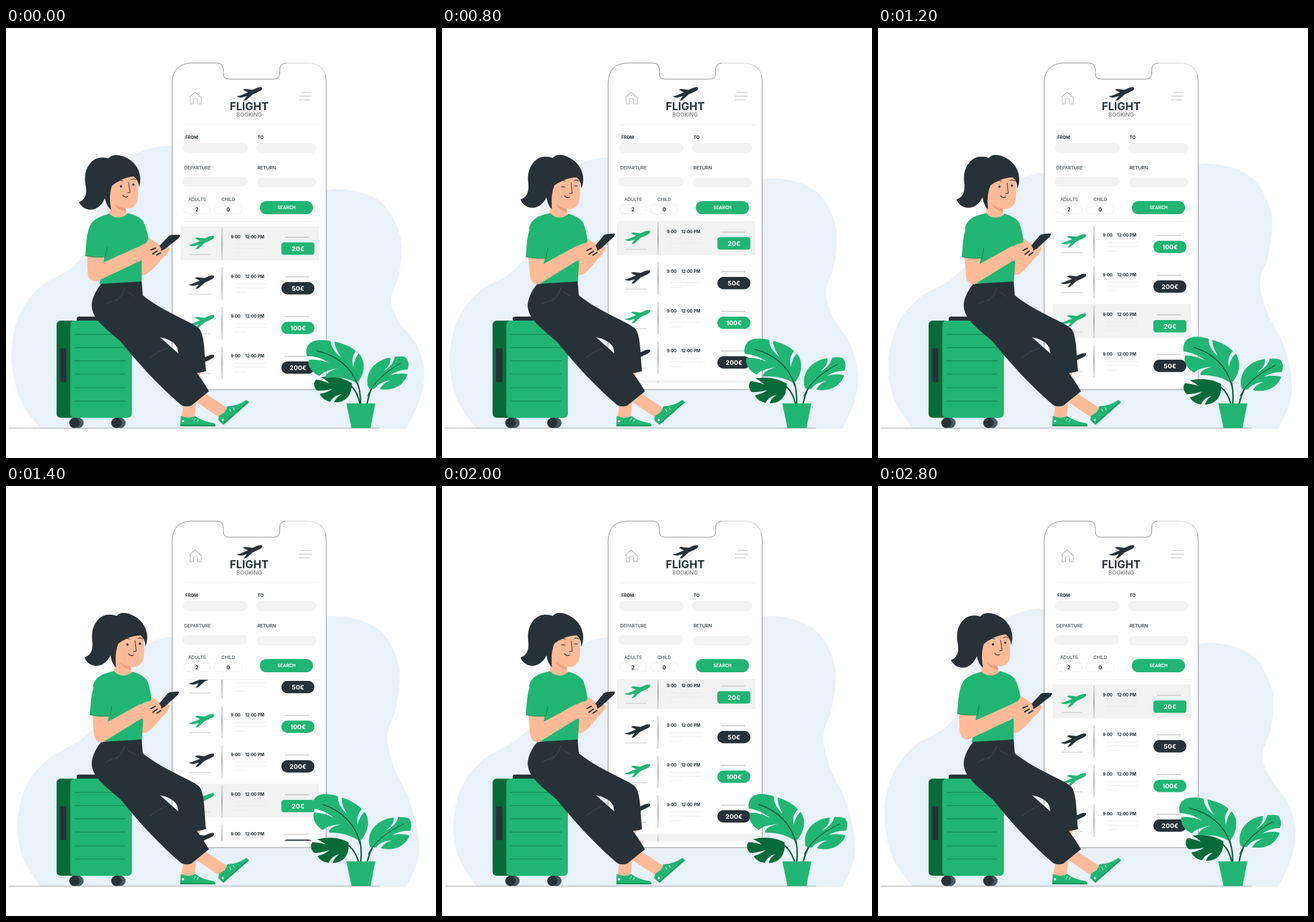
An HTML page that plays this animation: 748 by 748 pixels, repeating every 3 s.

```html
<!DOCTYPE html>
<html lang="en">
<head>
<meta charset="utf-8">
<style>
  html, body { margin: 0; width: 100%; height: 100%; overflow: hidden; background: #fff; }
  svg { display: block; width: 100vw; height: 100vh; }
  text { font-family: Inter, "Open Sans", sans-serif; fill: #263238; }
  .b { font-weight: 700; }
  .g { fill: #21b573; }
  .d { fill: #263238; }
  .s { fill: #ffbb98; }
  .deep { fill: #066b38; }
  .line { fill: none; stroke-linecap: round; stroke-linejoin: round; }
  .field { fill: #f3f3f3; }
  .stem { fill: none; stroke: #0d5937; stroke-width: 2.4; stroke-linecap: round; }
</style>
</head>
<body>
<svg viewBox="0 0 748 748">
  <defs>
    <path id="plane" d="M22.500,-11C23.500,-8 20,-6 15,-3.500L6,.5L-5,10.500L-10,11.500L-4,3.500L-13,6Q-18,6.500 -22,3.500L-17,3L-13,1.500L-2,-3L-11,-7.500L-7,-9L6,-7.500L13,-10.500C17,-12 21.500,-12.500 22.500,-11Z"/>
    <clipPath id="listArea"><path d="M290,337H556V617H290Z"/></clipPath>
    <linearGradient id="fade" x1="0" x2="0" y1="0" y2="1">
      <stop offset="0" stop-color="#ccc"/><stop offset=".5" stop-color="#888"/><stop offset="1" stop-color="#ccc"/>
    </linearGradient>
  </defs>

  <path id="blob" fill="#e9f1f9"/>
  <path d="M5,696H651" stroke="#999" stroke-width=".9"/>

  <g id="device">
    <path d="M322,61H368Q378,62 378,73V79Q378,89 388,89H466Q476,89 476,79V73Q476,62 486,61H524Q557,62 557,95V613Q557,629 541,629H305Q289,629 289,613V95Q290,62 322,61Z" fill="#fff" stroke="#777" stroke-width=".9"/>
    <path d="M487,61H524Q548,62 555,82" fill="none" stroke="#fff" stroke-opacity=".75" stroke-width="1.400"/>
    <path class="line" d="M319.500,120L329,111.500L339.500,121V132H333V124Q329,121 326,124V132H320.500V120" stroke="#b5b5b5" stroke-width="1.100"/>
    <path class="line" d="M514,112H531M510,118.500H531M510,125H528" stroke="#b5b5b5" stroke-width="1.100"/>
    <use href="#plane" class="d" x="423" y="115"/>
    <path d="M311,168.500H545" stroke="#e6e6e6"/>
    <path d="M308,336.500H545" stroke="#f0f0f0"/>
    <rect class="field" x="308" y="200" width="112" height="17.500" rx="8.700"/>
    <rect class="field" x="435" y="200" width="105" height="17.500" rx="8.700"/>
    <rect class="field" x="307" y="259" width="113" height="17" rx="8.500"/>
    <rect class="field" x="436" y="260.500" width="104" height="17" rx="8.500"/>
    <rect x="309.500" y="306.500" width="46" height="17" rx="8.500" fill="#fff" stroke="#ececec"/>
    <rect x="362.500" y="306.500" width="48" height="17" rx="8.500" fill="#fff" stroke="#ececec"/>
    <rect class="g" x="441.500" y="301" width="92.500" height="23" rx="11.500"/>
    <g text-anchor="middle">
      <text class="b" x="423" y="142.500" font-size="18.800">FLIGHT</text>
      <text x="423" y="154" font-size="9.600" style="fill:#666">BOOKING</text>
      <text x="332.500" y="301" font-size="7.800">ADULTS</text>
      <text x="386.500" y="301" font-size="7.800">CHILD</text>
      <text class="b" x="332" y="319" font-size="9">2</text>
      <text class="b" x="386.500" y="319" font-size="9">0</text>
      <text class="b" x="488" y="315" font-size="7.600" style="fill:#fff">SEARCH</text>
    </g>
    <text class="b" x="312" y="193" font-size="7.400">FROM</text>
    <text class="b" x="437.500" y="193" font-size="7.600">TO</text>
    <text x="310" y="245.500" font-size="7.900">DEPARTURE</text>
    <text x="437.500" y="245.500" font-size="7.900" font-weight="500">RETURN</text>
    <g clip-path="url(#listArea)"><g id="rows"></g></g>
  </g>

  <g id="suitcase">
    <path class="d" d="M123,509V505Q123,502 127,502H160V509Z"/>
    <g id="wheels"></g>
    <path class="deep" d="M96,509H130V678H96Q88,678 88,670V517Q88,509 96,509Z"/>
    <rect class="g" x="112" y="509" width="107" height="169" rx="7"/>
    <rect class="d" x="94" y="557" width="11" height="59" rx="1.500"/>
    <path id="ridges" stroke="#0b7a42" stroke-width="1.100"/>
  </g>

  <g id="woman">
    <path class="s" id="farArm"/>
    <g id="torso">
      <g id="head">
        <path class="s" d="M178,262L226,252C230,275 231,294 228,303C223,314 212,315 208,313L211,328C202,336 189,332 180,325Z"/>
        <path d="M188,305Q198,314 208,313L209,319Q195,318 188,305Z" fill="#f29d78"/>
        <path class="d" d="M178,227C148,218 134,248 138,270C141,286 140,297 127,303C134,319 160,324 172,296C174,305 177,312 183,316C180,302 180,288 184,275C194,266 206,260 222,258C228,263 231,269 231,277C238,261 232,233 203,223C191,219 183,221 178,227Z"/>
        <path class="line" d="M193,268Q198,263 203,266M218,264Q222,261 226,264M213,268L216,286L211,287" stroke="#263238" stroke-width="1.100"/>
        <path class="line" d="M203,291Q207,296 212,293" stroke="#263238" stroke-width="1.300"/>
        <g id="eyesOpen" class="d"><circle cx="200" cy="275.500" r="2"/><circle cx="221.500" cy="272.500" r="2"/></g>
        <path id="eyesShut" class="line" d="M197,276H203M219,273H224" stroke="#263238" stroke-width="1.200"/>
      </g>
      <path class="g" d="M180,323C188,332 204,332 212,322C224,325 234,329 239,337C243,346 246,356 248,367L236,386L236,446H163L171,398L145,352C148,333 163,328 180,323Z"/>
    </g>
    <path class="s" d="M318,598L338,599L328,675Q316,681 305,677Z"/>
    <path class="s" d="M330,650L347,636L385,661L372,678Z"/>
    <path class="d" d="M215,460L238,465C275,495 324,511 336,523C346,534 345,570 348,597Q330,602 306,603L298,556C292,545 280,540 268,538Z"/>
    <path class="d" d="M166,445L236,441L238,465L268,538L303,569C327,590 343,614 353,632L322,657Q312,660 305,656C270,627 234,588 200,546C180,528 154,510 150,490C146,476 156,456 166,445Z"/>
    <path class="line" d="M174,480L195,471M207,452Q201,468 190,477M211,459L224,467M250,574Q264,563 280,557" stroke="#4a5a62" stroke-width=".8"/>
    <path class="g" d="M304,675Q318,681 329,675Q343,685 361,687Q366,690 364,693H303Z"/>
    <path class="g" d="M371,674Q383,669 385,658Q402,658 418,647L423,651L379,690Q373,687 369,682Z"/>
    <path class="line" d="M304,691L363,692M377,689L421,651" stroke="#087443" stroke-width="1"/>
    <path class="line" d="M327,683L330,679M332,685L335,681M391,667L389,663M397,664L395,660" stroke="#fff" stroke-width="1"/>
    <g fill="#fff"><circle cx="308" cy="684" r="2"/><circle cx="377" cy="682" r="2"/></g>
    <path class="s" id="nearArm"/>
    <g id="sleeve">
      <path class="g" d="M160,331C143,337 140,358 138,396Q156,400 173,398L184,360Z"/>
      <path class="line" d="M138,396Q156,400 173,398L176,381" stroke="#0b7a42" stroke-width=".9"/>
    </g>
    <g id="hands">
      <path class="s" d="M260,388L275,378L285,383C283,392 275,400 264,406L252,402Z"/>
      <path class="d" d="M264,382L283,362Q286,359 302,360Q304,361 300,366L277,384L268,389Z"/>
      <path class="s" d="M229,383Q239,373 253,373Q264,373 268,380Q272,386 268,391L258,394Q250,403 233,403Z"/>
      <path class="line" d="M252,386L260,383M255,393L263,388M262,395L269,391" stroke="#263238" stroke-width="2.200"/>
    </g>
  </g>

  <g id="plant">
    <g id="darkLeaf">
      <path class="stem" d="M616,655Q611,628 596,620"/>
      <path class="deep" d="M602,618C602,640 590,652 571,651C573,645 578,640 584,637C574,638 567,644 564,650C553,647 548,641 546,636C554,635 562,632 568,628C558,630 548,631 541,630C535,624 535,615 540,611C548,612 556,615 563,618C558,613 553,609 548,607C565,604 586,607 602,618Z"/>
    </g>
    <g id="rightLeaf">
      <path class="stem" d="M628,655Q630,640 638,621Q655,596 686,583"/>
      <path class="g" d="M630,625C623,600 640,578 668,573C670,582 664,590 656,597C667,591 674,582 676,572Q686,570 694,572C701,578 701,588 698,594C688,594 676,598 668,604C680,600 690,600 698,602C692,622 672,632 650,628C655,620 660,616 668,613C656,614 646,620 642,627Q634,630 630,625Z"/>
      <path class="stem" style="stroke-width:1.300" d="M629,640Q642,608 686,583"/>
    </g>
    <g id="bigLeaf">
      <path class="stem" d="M617,655Q617,628 607,606"/>
      <path class="g" d="M611,618C600,612 585,606 556,609C555,602 563,597 576,592C561,595 550,599 545,606C531,600 524,588 526,578C536,576 548,578 562,583C550,575 535,571 523,571C519,556 526,543 548,543Q558,543 564,545C565,555 571,565 583,573C575,562 571,553 571,546C588,549 602,556 608,562C601,572 601,580 604,590C605,580 608,572 613,566C626,579 624,602 611,618Z"/>
      <path class="stem" style="stroke-width:1.800" d="M540,562C573,569 600,588 612,622"/>
    </g>
    <path class="g" d="M592,653H642.500L634,696H601Z"/>
  </g>
</svg>
<script>
const $ = id => document.getElementById(id);
const LOOP = 3000, STEP = 200, ROW = 69;

// Each outline point: x, y and how far it drifts over half a loop.
const BLOB = [
  [60,697,0,0], [24,645,6,2], [9,570,12,20], [22,500,14,25], [60,448,14,30], [115,415,15,30],
  [145,370,20,40], [158,310,25,45], [185,245,30,55], [230,214,25,64], [288,202,2,67],
  [360,215,0,50], [450,262,10,-10], [520,290,0,-60], [575,283,0,-63], [630,293,0,-60],
  [664,318,0,-56], [687,370,-3,-55], [684,430,-6,-50], [670,475,-7,-45], [684,512,-10,-24],
  [714,550,-16,-10], [728,595,-13,8], [720,645,-4,5], [697,697,0,0]
];
const LEAN = [[0,0], [200,.12], [400,.42], [600,.8], [800,1], [2200,1], [2400,.6], [2600,.15], [2800,0], [3000,0]];
const SCROLL = [[0,0], [600,0], [800,9], [1000,190], [1200,141], [1400,103], [1600,69], [1800,39], [2000,16], [2200,4], [2400,0], [3000,0]];

function at(keys, t) {
  const i = keys.findIndex(k => k[0] > t);
  const [t0, a] = keys[i - 1], [t1, b] = keys[i];
  return a + (b - a) * (t - t0) / (t1 - t0);
}

function smoothPath(pts) {
  let d = `M${pts[0]}`;
  for (let i = 0; i < pts.length - 1; i++) {
    const a = pts[i], b = pts[i + 1], before = pts[i - 1] || a, after = pts[i + 2] || b;
    const c1 = a.map((v, k) => v + (b[k] - before[k]) / 6);
    const c2 = b.map((v, k) => v - (after[k] - a[k]) / 6);
    d += `C${c1} ${c2} ${b}`;
  }
  return d + 'Z';
}

function row(i) {
  const price = [20, 50, 100, 200][i % 4], tone = i % 2 ? 'd' : 'g';
  return `<g transform="translate(0 ${i * ROW})">
    ${price === 20 ? '<path d="M304,345H545V404H304Z" fill="#f2f2f2"/>' : ''}
    <use href="#plane" class="${tone}" x="339.500" y="373.500"/>
    <path d="M319,394H356" stroke="#bbb" stroke-width=".9"/>
    <rect x="375" y="347" width="1.500" height="57" fill="url(#fade)"/>
    <text class="b" x="391" y="365.500" font-size="7.300">9:00</text>
    <text class="b" x="416" y="365.500" font-size="7.300">12:00 PM</text>
    <path d="M397,376H452M397,383H452M397,391H417" stroke="#e8e8e8" stroke-width=".9"/>
    <path d="M485,364H527" stroke="#aaa" stroke-width="1.100"/>
    <rect class="${tone}" x="479" y="373" width="57.500" height="21.500" rx="${price === 20 ? 4.5 : 10.7}"/>
    <text class="b" x="508" y="388" font-size="11" text-anchor="middle" style="fill:#fff">${price}€</text>
  </g>`;
}

$('rows').innerHTML = [0, 1, 2, 3, 4, 5, 6, 7].map(row).join('');
$('ridges').setAttribute('d', [533, 556, 579, 602, 626, 649].map(y => `M119,${y}H208`).join(''));
$('wheels').innerHTML = [119, 192].map(x =>
  `<rect x="${x - 3}" y="676" width="13" height="8" fill="#263238"/>
   <circle cx="${x + 7}" cy="687" r="9" fill="#455a64"/><circle cx="${x}" cy="687" r="9" fill="#263238"/>`).join('');

const transform = (id, value) => $(id).setAttribute('transform', value);

function draw(t) {
  const sway = (1 - Math.cos(2 * Math.PI * (t - 200) / LOOP)) / 2;
  const lean = at(LEAN, t);
  const blink = t === 800 || t === 2000;

  $('blob').setAttribute('d', smoothPath(BLOB.map(([x, y, dx, dy]) => [x + dx * sway, y + dy * sway])));
  transform('bigLeaf', `rotate(${7.5 * sway} 612 655)`);
  transform('rightLeaf', `rotate(${5 * sway} 625 655)`);
  transform('darkLeaf', `translate(${-2.5 * sway} 0) rotate(${-7 * sway} 615 655)`);
  transform('rows', `translate(0 ${-at(SCROLL, t)})`);

  transform('torso', `rotate(${3.8 * lean} 200 445)`);
  transform('sleeve', `translate(${8 * lean} ${2 * lean})`);
  transform('hands', `rotate(${-4 * lean} 265 385)`);
  const ex = 11 * lean, ey = 5 * lean;
  $('nearArm').setAttribute('d', `M${141 + 9 * lean},394L${142 + ex},${425 + ey}Q${143 + ex},${441 + ey} ${157 + ex},${441 + ey}L238,403L234,379L${169 + ex * .7},${408 + ey * .5}L${172 + 8 * lean},394Z`);
  $('farArm').setAttribute('d', `M232,386L${248 + 3 * lean},365L281,386Q266,413 ${243 + 2 * lean},429L233,430Z`);
  $('eyesOpen').style.display = blink ? 'none' : '';
  $('eyesShut').style.display = blink ? '' : 'none';
}

function tick() {
  draw(Math.floor(performance.now() % LOOP / STEP) * STEP);
  requestAnimationFrame(tick);
}
tick();
</script>
</body>
</html>
```
